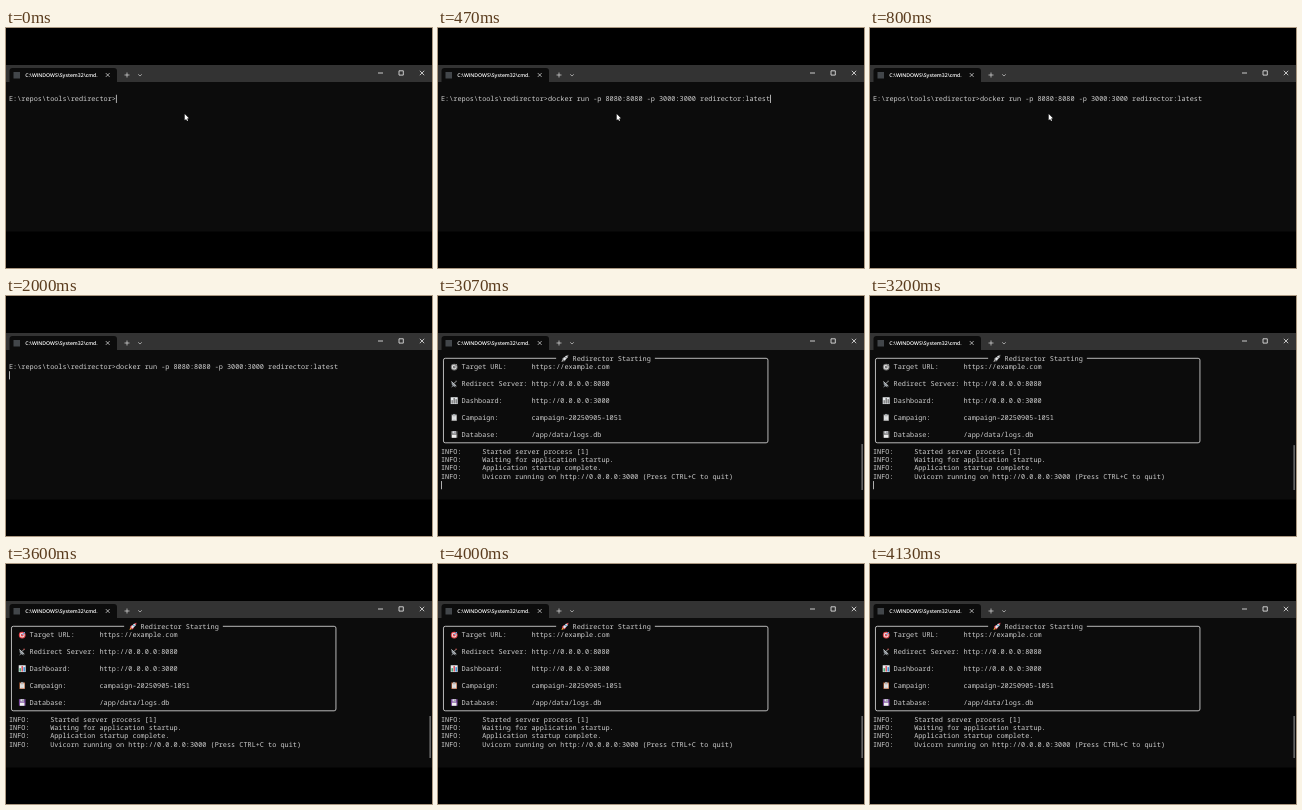
Recreate the animation shown at these times as an HTML page with a canvas. Size 426 by 240 pixels, loop 4.47 s.

```html
<!DOCTYPE html>
<html lang="en">
<head>
<meta charset="utf-8">
<title>Terminal</title>
<style>
html, body { margin: 0; width: 100%; height: 100%; overflow: hidden; background: #000; }
canvas { display: block; width: 426px; height: 240px; }
</style>
</head>
<body>
<canvas id="stage" width="426" height="240"></canvas>
<script>
const ctx = document.getElementById('stage').getContext('2d');
const LOOP = 4470;
const CELL = 4.1125, LEFT = 3, TOP = 62.3, ROW = 8.45;
const PROMPT = 'E:\\repos\\tools\\redirector>';
const COMMAND = 'docker run -p 8080:8080 -p 3000:3000 redirector:latest';
const FIELDS = [
  ['Target URL:', 'https://example.com'],
  ['Redirect Server:', 'http://0.0.0.0:8080'],
  ['Dashboard:', 'http://0.0.0.0:3000'],
  ['Campaign:', 'campaign-20250905-1051'],
  ['Database:', '/app/data/logs.db']
];
const LOG = [
  'Started server process [1]',
  'Waiting for application startup.',
  'Application startup complete.',
  'Uvicorn running on http://0.0.0.0:3000 (Press CTRL+C to quit)'
];

let muted = false;
const colX = col => LEFT + col * CELL;
const rowY = row => TOP + row * ROW;

// Icons lose their colour while the panel is fresh.
function tint(hex) {
  if (!muted) return hex;
  const [r, g, b] = [1, 3, 5].map(i => parseInt(hex.slice(i, i + 2), 16));
  const l = Math.round(0.3 * r + 0.59 * g + 0.11 * b);
  return `rgb(${l},${l},${l})`;
}

function rect(color, x, y, w, h) {
  ctx.fillStyle = color;
  ctx.fillRect(x, y, w, h);
}

function disc(color, x, y, r) {
  ctx.fillStyle = color;
  ctx.beginPath();
  ctx.arc(x, y, r, 0, 7);
  ctx.fill();
}

function poly(color, ...p) {
  ctx.fillStyle = color;
  ctx.beginPath();
  for (let i = 0; i < p.length; i += 2) ctx.lineTo(p[i], p[i + 1]);
  ctx.closePath();
  ctx.fill();
}

function line(color, width, ...p) {
  ctx.strokeStyle = color;
  ctx.lineWidth = width;
  ctx.beginPath();
  for (let i = 0; i < p.length; i += 2) ctx.lineTo(p[i], p[i + 1]);
  ctx.stroke();
}

function cross(x, y, r, width) {
  line('#e8e8e8', width, x - r, y - r, x + r, y + r);
  line('#e8e8e8', width, x - r, y + r, x + r, y - r);
}

// Terminal text sits on a fixed cell grid.
function print(text, col, row) {
  ctx.font = '6.854px "Noto Sans Mono", "DejaVu Sans Mono", monospace';
  ctx.fillStyle = '#d0d0d0';
  [...text].forEach((ch, i) => ctx.fillText(ch, colX(col + i), rowY(row) + 2.3));
}

function caret(col, row) {
  rect('#d8d8d8', colX(col), rowY(row) - 4, 0.8, 8.2);
}

function drawWindow() {
  rect('#000000', 0, 0, 426, 240);
  rect('#0c0c0c', 0, 37, 426, 166.5);
  rect('#333333', 0, 37, 426, 17);
  ctx.fillStyle = '#0c0c0c';
  ctx.beginPath();
  ctx.roundRect(3.5, 40, 107.5, 14, [3, 3, 0, 0]);
  ctx.fill();

  rect('#42464a', 7.5, 44, 6.5, 6.5);
  ctx.font = '600 5.15px "Open Sans", "Noto Sans", sans-serif';
  ctx.fillStyle = '#ffffff';
  ctx.fillText('C:\\WINDOWS\\System32\\cmd.', 19.2, 49);

  cross(101.7, 47, 1.9, 0.7);
  line('#e0e0e0', 0.7, 118.5, 47, 123.5, 47);
  line('#e0e0e0', 0.7, 121, 44.5, 121, 49.5);
  line('#d0d0d0', 0.7, 132.2, 46.3, 134, 48, 135.8, 46.3);
  line('#f0f0f0', 0.8, 372, 45, 377, 45);
  ctx.strokeStyle = '#f0f0f0';
  ctx.strokeRect(393, 42.8, 4.3, 4.3);
  cross(416, 45, 2.2, 0.8);
}

function drawPointer() {
  ctx.lineJoin = 'round';
  poly('#ffffff', 178.7, 86, 178.7, 92.2, 180.1, 90.9, 181.1, 93, 182, 92.6, 181.1, 90.5, 182.9, 90.3);
}

const icons = [
  function target() {
    disc(tint('#e5484f'), 0, 0.3, 3.4);
    disc('#f2f2f2', 0, 0.3, 2.4);
    disc(tint('#e5484f'), 0, 0.3, 1.5);
    line(tint('#4aa3e8'), 1, 0, 0.3, 2.8, -2.8);
  },
  function antenna() {
    poly('#8e959b', -2.8, -2, 2, 2.2, -0.6, 2.9, -2.4, 1.2);
    line('#c9ced2', 0.9, -2.8, -2.2, 2.2, 2.4);
    line('#d8dcdf', 0.8, -0.4, 0, 1.8, -2.2);
    disc(tint('#e05a55'), 1.9, -2.5, 0.7);
    line('#a5abb0', 0.9, -2.6, 3.3, -0.8, 1.8, 1.4, 3.3);
  },
  function chart() {
    rect('#e9edf0', -3.5, -3.3, 7, 6.8);
    rect(tint('#35a86b'), -2.7, -0.4, 1.4, 3.4);
    rect(tint('#d94a55'), -0.7, -2.5, 1.4, 5.5);
    rect(tint('#2f87d8'), 1.3, -1.4, 1.4, 4.4);
  },
  function clipboard() {
    rect(tint('#b9673f'), -2.8, -3, 5.6, 6.5);
    rect('#eeeeee', -2.1, -2.1, 4.2, 5);
    rect('#9aa0a5', -1.2, -3.5, 2.4, 1.4);
    for (let y = -0.9; y < 2.5; y += 1.2) rect('#a4a9ad', -1.4, y, 2.8, 0.45);
  },
  function floppy() {
    rect(tint('#7a4a9c'), -3.3, -3.2, 6.6, 6.6);
    rect('#d9dce0', -1.8, -3.2, 3.6, 2.4);
    rect('#55505c', 0.4, -2.8, 0.8, 1.5);
    rect('#f0f0f0', -2.2, 0.3, 4.4, 3.1);
  }
];

function rocket() {
  poly(tint('#f2a33c'), -3.6, 3.7, -2.6, 0.9, -0.8, 2.7);
  poly(tint('#dc4454'), -3.2, 0.6, -1.2, -1.2, 1.2, 1.2, -0.5, 3.3);
  poly('#e6e9ec', -2, 0.8, 0.9, -2.6, 2.6, -2.6, 2.7, -0.9, -0.7, 2.2);
  poly(tint('#dc4454'), 1.4, -3, 3.6, -3.6, 3, -1.4);
  disc(tint('#3f8fd2'), 0.9, -0.8, 0.8);
}

function at(x, y, draw) {
  ctx.save();
  ctx.translate(x, y);
  draw();
  ctx.restore();
}

function drawPanel() {
  const l = colX(0.6), r = colX(79.5), b = rowY(10), k = 1.8;
  ctx.strokeStyle = '#cccccc';
  ctx.lineWidth = 0.9;
  ctx.beginPath();
  ctx.moveTo(colX(28), TOP);
  ctx.arcTo(l, TOP, l, b, k);
  ctx.arcTo(l, b, r, b, k);
  ctx.arcTo(r, b, r, TOP, k);
  ctx.arcTo(r, TOP, l, TOP, k);
  ctx.lineTo(colX(52), TOP);
  ctx.stroke();

  at(127, TOP, rocket);
  print('Redirector Starting', 32, 0);
  FIELDS.forEach(([label, value], i) => {
    const row = 1 + 2 * i;
    at(16.2, rowY(row), icons[i]);
    print(label, 5, row);
    print(value, 22, row);
  });
  LOG.forEach((text, i) => {
    print('INFO:', 0, 11 + i);
    print(text, 10, 11 + i);
  });
}

function drawOutput(t) {
  muted = t < 3600;
  drawPanel();
  if (t < 3530) caret(0, 15);
  const p = Math.min(1, (t - 3070) / 460);
  const top = 148 + 4 * p;
  rect('#9c9c9c', 423.6, top, 1, 194 - top);
}

function draw(t) {
  drawWindow();
  if (t >= 3070) return drawOutput(t);

  print(PROMPT, 0, 1);
  if (t >= 470) print(COMMAND, PROMPT.length, 1);
  if (t < 470) caret(PROMPT.length, 1);
  else if (t < 800) caret(80, 1);
  else if (t >= 2000) caret(0, 2);
  if (t < 2000) drawPointer();
}

ctx.textRendering = 'geometricPrecision';
const start = performance.now();
function tick() {
  draw((performance.now() - start) % LOOP);
  requestAnimationFrame(tick);
}
tick();
</script>
</body>
</html>
```
